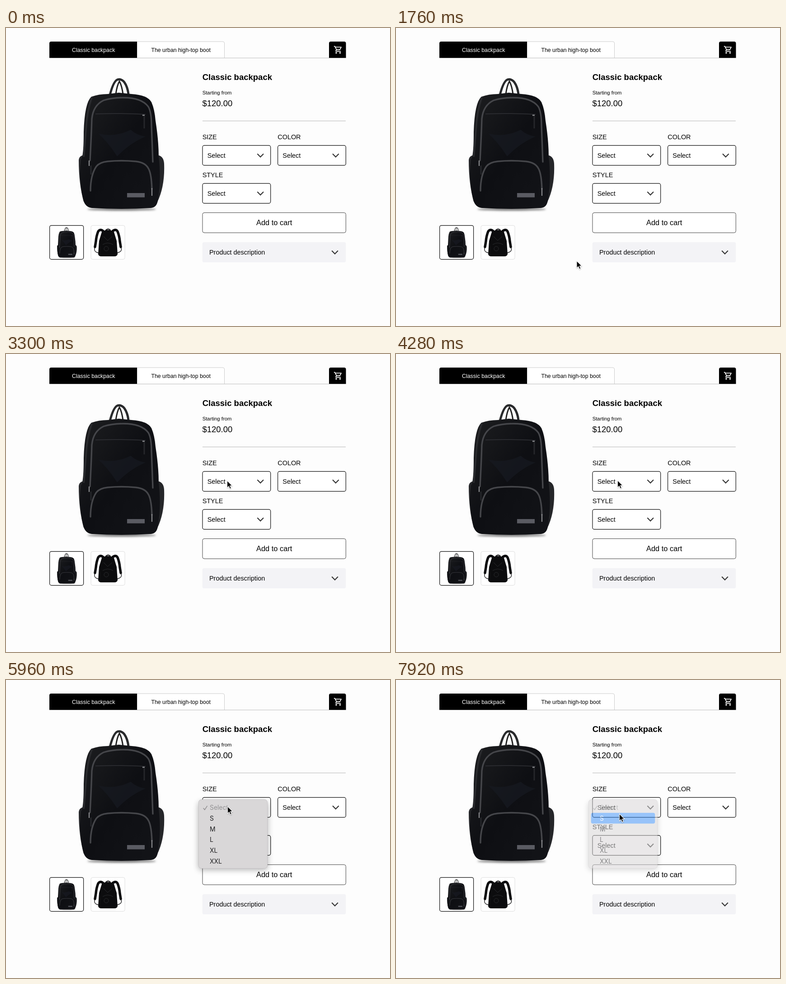
An HTML page that plays this animation: 850 by 659 pixels, repeating every 8000 ms.

```html
<!DOCTYPE html>
<html lang="en">
<head>
<meta charset="utf-8">
<title>Product page</title>
<style>
  html, body { margin: 0; width: 100%; height: 100%; overflow: hidden; background: #fdfdfd; }
  svg { display: block; width: 850px; height: 659px; font-family: "Liberation Sans", Arial, sans-serif; }
  #menu { font: 13.9px Inter, "Open Sans", sans-serif; }
  .box { fill: #fff; stroke: #111; stroke-width: 1.2; }
  .chevron { fill: none; stroke: #333; stroke-width: 2.2; }
  .piping { fill: none; stroke: #45464a; stroke-width: 3.4; stroke-linecap: round; }
</style>
</head>
<body>
<svg viewBox="0 0 850 659">
  <defs>
    <linearGradient id="cloth" x1="0" y1="0" x2="1" y2="1">
      <stop offset="0" stop-color="#1d1e20"/>
      <stop offset=".5" stop-color="#0e0f13"/>
      <stop offset="1" stop-color="#131418"/>
    </linearGradient>
    <filter id="soft" x="-20%" y="-200%" width="140%" height="500%"><feGaussianBlur stdDeviation="2"/></filter>
    <filter id="shade" x="-20%" y="-20%" width="140%" height="140%"><feGaussianBlur stdDeviation="7"/></filter>
    <filter id="drop" x="-50%" y="-50%" width="200%" height="200%"><feDropShadow dx="0" dy="1" stdDeviation=".8" flood-opacity=".35"/></filter>
    <path id="chevron" class="chevron" d="M-6.8-3.6 0 3.4 6.8-3.6"/>

    <g id="pack">
      <ellipse cx="256" cy="401" rx="76" ry="3" fill="#777" filter="url(#soft)"/>
      <path d="M230 148Q238 117 247 114Q256 112 262 120Q269 130 271 146" fill="none" stroke="#292a2c" stroke-width="5"/>
      <path d="M243 146Q246 126 251 118Q256 126 259 146" fill="none" stroke="#222" stroke-width="3"/>
      <path d="M176 281Q162 281 161 292Q161 345 172 384L181 360ZM334 281Q349 282 350 300Q352 350 335 385L326 350Z" fill="#252629"/>
      <path d="M189 152Q205 146 225 146L250 143L278 146Q313 148 322 164Q329 180 331 205Q338 250 338 284Q344 340 336 380Q335 396 321 398Q255 402 190 398Q175 396 171 380Q160 335 166 290Q172 285 172 230Q174 165 189 152Z" fill="url(#cloth)"/>
      <path d="M190 153Q179 185 177 225L172 285" fill="none" stroke="#292a2d" stroke-width="4"/>
      <path d="M204 233Q240 243 276 225Q291 238 309 240Q275 254 246 284Q228 255 204 233Z" fill="#181a22" opacity=".7"/>
      <path class="piping" d="M186 293Q189 235 190 201Q193 171 216 160Q235 154 260 154Q300 154 315 174Q322 186 322 215L325 296"/>
      <path class="piping" d="M187 360Q187 325 200 306Q207 297 225 295Q255 292 287 295Q309 297 316 312Q322 324 323 356"/>
      <path d="M198 190Q250 188 309 191" fill="none" stroke="#303136" stroke-width="1.6"/>
      <path d="M302 193h5M184 293v12M323 354v17" stroke="#88898c" stroke-width="2.3"/>
      <path d="M306 194v28M188 304v20" stroke="#25262a" stroke-width="3"/>
      <rect x="268" y="365" width="39" height="9.5" fill="#5a5b62"/>
    </g>
  </defs>

  <rect width="850" height="659" fill="#fdfdfd"/>
  <path d="M290 66V30H480Q483.5 30 483.5 34V66" fill="#fff" stroke="#ccc"/>
  <path d="M96 66.3H752.5" stroke="#c8c8c8" stroke-width="1.2"/>
  <path d="M96 66V34Q96 30 100 30H290V66ZM715 66V34Q715 30 719 30H748.5Q752.5 30 752.5 34V66Z"/>
  <path transform="translate(725 38) scale(.85)" fill="#fff" d="M15.55 13c.75 0 1.41-.41 1.75-1.03l3.58-6.49A1 1 0 0 0 20 4H5.21l-.94-2H1v2h2l3.6 7.59-1.35 2.44C4.52 15.37 5.48 17 7 17h12v-2H7l1.1-2zM6.16 6h12.15l-2.76 5H8.53zM7 18a2 2 0 1 0 0 4 2 2 0 0 0 0-4zm10 0a2 2 0 1 0 0 4 2 2 0 0 0 0-4z"/>

  <use href="#pack"/>
  <rect class="box" x="96.6" y="436.6" width="75" height="75" rx="4"/>
  <use href="#pack" transform="translate(75.6 414.8) scale(.232)"/>
  <rect x="188.1" y="436.6" width="75" height="75" rx="4" fill="#fff" stroke="#ddd"/>
  <g fill="none" stroke="#0c0c0e" stroke-linecap="round">
    <path d="M216 450Q209 443 204 450Q200 460 199 472L197 484M235 450Q243 443 247 450Q251 460 252 472L254 484" stroke-width="5.5"/>
    <path d="M197 484Q193 495 204 497M254 484Q259 494 247 497" stroke-width="1.3"/>
    <path d="M221 447Q226 442 231 447" stroke-width="2"/>
  </g>
  <path d="M212 451Q225 442 239 451L245 471L247 500Q246 505 240 505H211Q205 505 204 500L206 471Z" fill="#0c0c0e"/>
  <path d="M216 461L225 470L235 461M214 479Q225 472 237 479" fill="none" stroke="#292a2d"/>
  <circle cx="222" cy="488" r="5" fill="none" stroke="#292a2d"/>

  <path d="M435 205.6H752" stroke="#cacaca" stroke-width="1.5"/>
  <g id="form"></g>

  <g id="menu">
    <rect x="426" y="270" width="153" height="150" rx="6" opacity=".3" filter="url(#shade)"/>
    <rect x="426.3" y="264.3" width="152.4" height="152.4" rx="6.5" fill="#d9d7d8" stroke="#bdbbbd" stroke-width=".7"/>
    <rect id="mark" x="431.7" y="293.7" width="141.6" height="23.8" rx="4" fill="#4595f7"/>
    <path d="M436.8 283.3L439.8 287L445.5 278.3" fill="none" stroke="#8f8e90" stroke-width="1.5"/>
  </g>
  <path id="cursor" d="M0 0V15.8L3.6 12.4L6.2 18.2L8.9 17L6.4 11.4H11.3Z" stroke="#fff" stroke-width="1.1" filter="url(#drop)"/>
</svg>

<script>
const LOOP = 8000, OPEN = 4580, FADE = 7800, LAST = 7920;
const $ = id => document.getElementById(id);
const form = $('form'), menu = $('menu'), mark = $('mark'), cursor = $('cursor');

function add(parent, tag, attrs, text = '') {
  const el = document.createElementNS('http://www.w3.org/2000/svg', tag);
  for (const key in attrs) el.setAttribute(key, attrs[key]);
  el.textContent = text;
  return parent.appendChild(el);
}

const label = (text, x, y, size, extra) =>
  add(form, 'text', { x, y, 'font-size': size, ...extra }, text);

const chevron = (x, y) => add(form, 'use', { href: '#chevron', x, y });

function select(name, x, y) {
  label(name, x, y - 13.5, 14.4);
  add(form, 'rect', { class: 'box', x: x + .3, y: y + .2, width: 150.7, height: 44, rx: 4 });
  label('Select', x + 11, y + 27.3, 14.4);
  chevron(x + 128.5, y + 22.3);
}

const centered = { 'text-anchor': 'middle' };
label('Classic backpack', 193.7, 52.6, 12.33, { ...centered, fill: '#fff' });
label('The urban high-top boot', 387.2, 52.6, 12.33, centered);
label('Classic backpack', 434.7, 114.5, 18.5, { 'font-weight': 700 });
label('Starting from', 434.7, 147.4, 11.3);
label('$120.00', 434.5, 173.2, 18.45);
select('SIZE', 434.7, 259.5);
select('COLOR', 601.3, 259.5);
select('STYLE', 434.7, 343.5);
add(form, 'rect', { x: 435, y: 408.4, width: 317.3, height: 44.4, rx: 4, fill: '#fff', stroke: '#444' });
label('Add to cart', 593.7, 436.4, 16.45, centered);
add(form, 'rect', { x: 434.7, y: 473.5, width: 317.6, height: 44.8, rx: 4, fill: '#f3f3f6' });
label('Product description', 450, 501.4, 14.4);
chevron(728, 496);

const options = ['Select', 'S', 'M', 'L', 'XL', 'XXL'].map((text, i) =>
  add(menu, 'text', { x: 451, y: 287.3 + i * 23.65, fill: i ? '#1d1d1f' : '#929193' }, text));

// Pointer stops: time, x, y
const stops = [
  [280, 372, 664], [700, 400, 515], [2040, 400, 515], [2460, 440.5, 308],
  [2900, 489.5, 280], [4000, 489.5, 280], [4200, 490.5, 279.5], [6000, 490.5, 279.5],
  [6500, 484.5, 298.5], [7250, 484.5, 298.5], [7650, 494.5, 296]
];

function pointer(t) {
  const next = stops.findIndex(s => s[0] > t);
  if (next < 0) return stops[stops.length - 1].slice(1);
  if (next === 0) return stops[0].slice(1);
  const [t0, x0, y0] = stops[next - 1], [t1, x1, y1] = stops[next];
  const k = (1 - Math.cos(Math.PI * (t - t0) / (t1 - t0))) / 2;
  return [x0 + (x1 - x0) * k, y0 + (y1 - y0) * k];
}

function draw(t) {
  const [x, y] = pointer(t);
  cursor.setAttribute('transform', `translate(${x} ${y})`);
  cursor.style.display = t < stops[0][0] ? 'none' : '';

  const hover = y > 293.7;
  menu.style.display = t < OPEN ? 'none' : '';
  menu.style.opacity = 1 - Math.max(0, Math.min(t, LAST) - FADE) / 265;
  mark.style.display = hover ? '' : 'none';
  options[1].setAttribute('fill', hover ? '#fff' : '#1d1d1f');
}

const start = performance.now();
function tick() {
  draw((performance.now() - start) % LOOP);
  requestAnimationFrame(tick);
}
draw(0);
requestAnimationFrame(tick);
</script>
</body>
</html>
```
